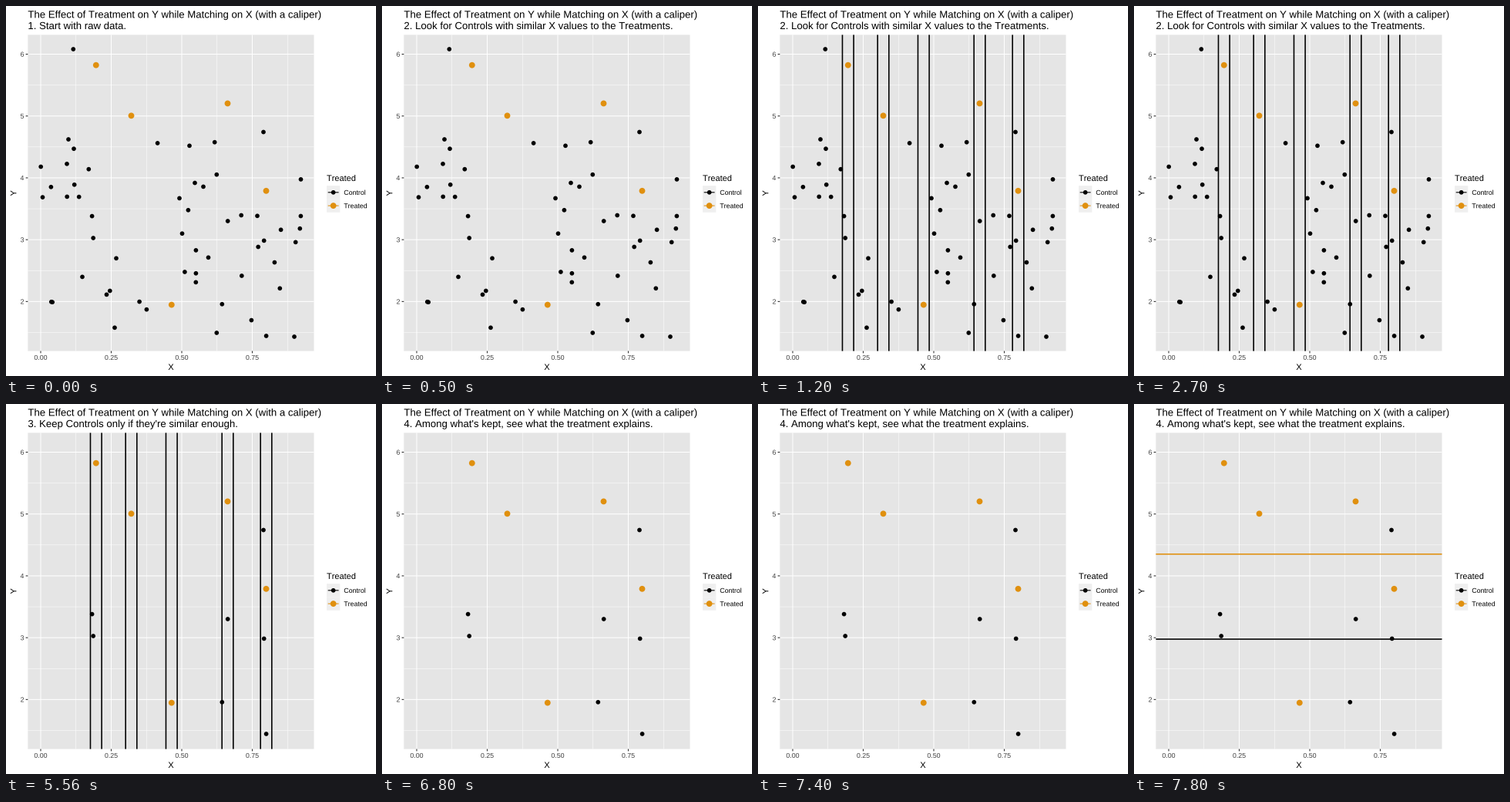
Recreate the animation shown at these times as a matplotlib script. Size 480 by 480 pixels, loop 8 s.

```python
import matplotlib.pyplot as plt
from matplotlib.animation import FuncAnimation
from matplotlib.patches import Circle, PathPatch, Rectangle
from matplotlib.textpath import TextPath
from matplotlib.transforms import Affine2D

SIZE, DPI = 480, 72          # at 72 dpi one point is one pixel
STEP, LOOP = 100, 8000       # ms
LEFT, RIGHT, TOP, BOTTOM = 28.4, 399.5, 37.4, 447.6
ORANGE, BLACK, PANEL, KEY = "#e0900f", "#000000", "#e5e5e5", "#efefef"
TICK, TICK_TEXT = "#2b2b2b", "#404040"
CONTROL_R, TREATED_R = 2.84, 3.9
CALIPER = 0.02 * 366

# Point centres in pixels
treated = [(116.8, 76.7), (162.5, 142.3), (287.5, 126.4), (337.5, 239.8),
           (214.8, 387.6)]
kept = [(111.6, 272.6), (113.2, 301.0), (287.7, 279.0), (280.3, 386.8),
        (334.0, 163.5), (334.7, 304.4), (337.6, 428.0)]
dropped = [
    (87.3, 56), (81, 173), (88, 185.2), (45.2, 208.5), (79, 204.8),
    (107.3, 211.7), (58.4, 234.8), (88.7, 231.8), (47.5, 248.1), (79.2, 247.4),
    (94.7, 247.6), (143, 327.3), (99, 351.4), (134.8, 369.5), (130.5, 374.4),
    (58.8, 383.8), (60.2, 384.2), (141, 417.3), (173.1, 383.6), (182.4, 393.7),
    (196.6, 177.9), (238, 181.3), (270.7, 176.7), (273.3, 218.7), (245, 229.5),
    (256, 234.4), (225, 249.4), (236.4, 264.8), (305.2, 271.5), (326, 272.3),
    (228.5, 295.2), (246.4, 316.9), (262.5, 326.3), (231.9, 345),
    (246.4, 346.8), (246.3, 358.4), (305.8, 350), (327.2, 312.5),
    (348.4, 332.6), (355.3, 366.3), (356.6, 290.3), (375.7, 306.4),
    (381.3, 288.7), (382.4, 272.5), (382.5, 224.9), (273.3, 424),
    (318.4, 407.6), (374, 429),
]

plt.rcParams["text.kerning_factor"] = 6   # plain advances, no kerning
fig = plt.figure(figsize=(SIZE / DPI, SIZE / DPI), dpi=DPI, facecolor="white")
ax = fig.add_axes([0, 0, 1, 1])
ax.set_xlim(0, SIZE)
ax.set_ylim(SIZE, 0)
ax.axis("off")


def px(x):
    return 45 + 366 * x


def py(y):
    return 62.5 + 80.22 * (6 - y)


def line(x0, y0, x1, y1, color, width, z=2):
    return ax.plot([x0, x1], [y0, y1], color=color, lw=width, zorder=z,
                   solid_capstyle="butt", snap=False)[0]


def dot(x, y, r, color, z=5):
    return ax.add_patch(Circle((x, y), r, fc=color, lw=0, zorder=z))


def box(x0, y0, x1, y1, color):
    ax.add_patch(Rectangle((x0, y0), x1 - x0, y1 - y0, fc=color, lw=0,
                           zorder=0, snap=False))


def label(x, y, text, size, color=BLACK, align="left", turn=0):
    """Text with its baseline at y, placed to a fraction of a pixel."""
    path = TextPath((0, 0), text, size=size, prop={"family": "Liberation Sans"})
    ext = path.get_extents()
    shift = {"left": 0, "center": -(ext.x0 + ext.x1) / 2, "right": -ext.x1}[align]
    move = Affine2D().translate(shift, 0).scale(1, -1).rotate_deg(turn)
    path = move.translate(x, y).transform_path(path)
    return ax.add_patch(PathPatch(path, fc=color, lw=0, zorder=6))


def draw_panel():
    box(LEFT, TOP, RIGHT, BOTTOM, PANEL)
    for i in range(4):
        x = px(i / 4)
        line(px(i / 4 + 0.125), TOP, px(i / 4 + 0.125), BOTTOM, "white", 0.53, 1)
        line(x, TOP, x, BOTTOM, "white", 1.07)
        line(x, BOTTOM, x, BOTTOM + 2.75, TICK, 1.07)
        label(x, 459, f"{i / 4:.2f}", 8.8, TICK_TEXT, "center")
    for v in range(2, 7):
        y = py(v)
        line(LEFT, py(v - 0.5), RIGHT, py(v - 0.5), "white", 0.53, 1)
        line(LEFT, y, RIGHT, y, "white", 1.07)
        line(LEFT - 2.75, y, LEFT, y, TICK, 1.07)
        label(23.1, y + 3.15, str(v), 8.8, TICK_TEXT, "right")
    label(214, 472, "X", 11, align="center")
    label(13.4, 242.8, "Y", 11, align="center", turn=-90)
    label(LEFT, 15.4, "The Effect of Treatment on Y while Matching on X "
          "(with a caliper)", 13.2)


def draw_legend():
    label(416, 227, "Treated", 11)
    rows = [("Control", BLACK, CONTROL_R), ("Treated", ORANGE, TREATED_R)]
    for i, (name, color, r) in enumerate(rows):
        y = 241.8 + 17.28 * i
        box(416, y - 8.64, 433.28, y + 8.64, KEY)
        line(417.7, y, 431.55, y, color, 1.07, 3)
        dot(424.64, y, r, color)
        label(438.3, y + 3.15, name, 8.8)


def mean_y(points):
    return sum(y for _, y in points) / len(points)


draw_panel()
draw_legend()
captions = [label(LEFT, 30, text, 13.2) for text in (
    "1. Start with raw data.",
    "2. Look for Controls with similar X values to the Treatments.",
    "3. Keep Controls only if they're similar enough.",
    "4. Among what's kept, see what the treatment explains.")]
for x, y in kept:
    dot(x, y, CONTROL_R, BLACK)
for x, y in treated:
    dot(x, y, TREATED_R, ORANGE)
dropped_dots = [dot(x, y, CONTROL_R, BLACK) for x, y in dropped]
calipers = [line(x + side, TOP, x + side, BOTTOM, BLACK, 1.6, 4)
            for x, _ in treated for side in (-CALIPER, CALIPER)]
means = [line(LEFT, y, RIGHT, y, color, 1.6, 4)
         for y, color in ((mean_y(treated) + 0.2, ORANGE), (mean_y(kept), BLACK))]


def show(artists, on):
    for artist in artists:
        artist.set_visible(on)


def update(i):
    t = i * STEP
    stage = sum(t >= start for start in (500, 3700, 6800))
    for n, caption in enumerate(captions):
        caption.set_visible(n == stage)
    show(dropped_dots, t < 3700)
    show(calipers, 1200 <= t < 6800)
    show(means, t >= 7800)
    return []


anim = FuncAnimation(fig, update, frames=LOOP // STEP, interval=STEP,
                     repeat=True, repeat_delay=0, blit=False)
plt.show()
```
